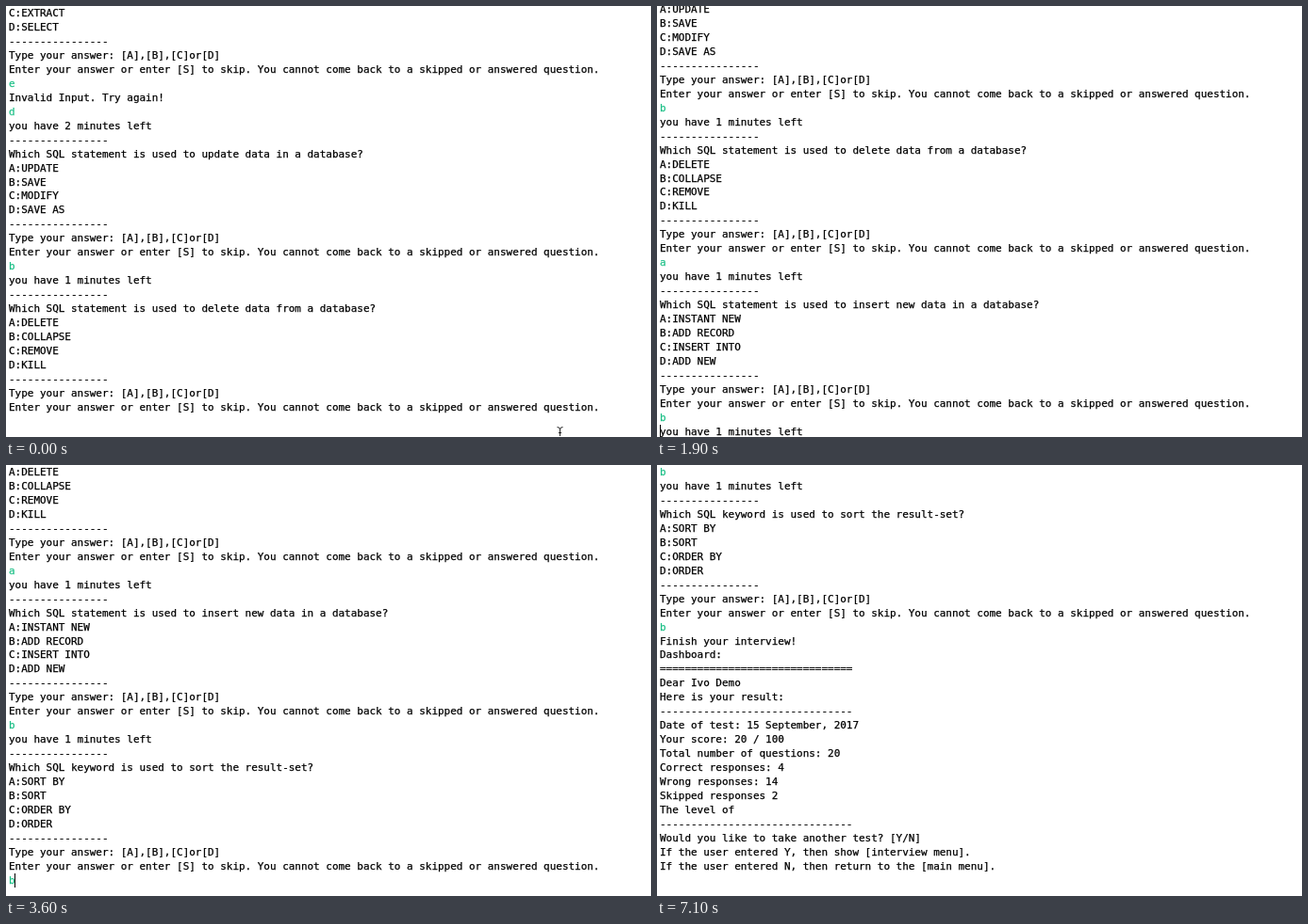
These frames come from a looping animation (684x458 px, 7200 ms). An HTML page:

```html
<!DOCTYPE html>
<html lang="en">
<head>
<meta charset="utf-8">
<title>Console quiz</title>
<style>
  html, body { margin: 0; width: 100%; height: 100%; overflow: hidden; background: #fff; }
  #stage { position: relative; width: 684px; height: 458px; overflow: hidden; background: #fff; }
  .row {
    position: absolute; left: 3px; white-space: pre; color: #000;
    font: 10.963px/15px "DejaVu Sans Mono", "Noto Sans Mono", monospace;
    font-variant-ligatures: none; -webkit-text-stroke: 0.25px;
  }
  .typed { color: #1fc088; }
  #caret { position: absolute; width: 1px; height: 15px; background: #000; }
  #pointer { position: absolute; left: 583px; top: 446px; }
</style>
</head>
<body>
<div id="stage">
  <div id="caret"></div>
  <svg id="pointer" width="10" height="12" fill="none" stroke="#222">
    <path d="M1.5 1.5Q4.5 1.5 4.5 4Q4.5 1.5 7.5 1.5M4.5 3.5V11M3 7.5H6"/>
  </svg>
</div>
<script>
const LOOP = 7200, ROW = 14.96, VISIBLE = 29;
const NUDGE = 4;         // px the view slips before it jumps to the end
const CARET_STAY = 500;  // ms the caret stays after an answer is entered
const stage = document.getElementById("stage");
const caret = document.getElementById("caret");
const pointer = document.getElementById("pointer");

const rule = (n, mark = "-") => mark.repeat(n);
const prompt = [
  rule(16),
  "Type your answer: [A],[B],[C]or[D]",
  "Enter your answer or enter [S] to skip. You cannot come back to a skipped or answered question."
];
const left = n => [`you have ${n} minutes left`, rule(16)];
const ask = (question, ...options) => [
  question, ...options.map((text, i) => "ABCD"[i] + ":" + text), ...prompt
];

const lines = [
  "C:EXTRACT", "D:SELECT", ...prompt,
  "e", "Invalid Input. Try again!", "d", ...left(2),
  ...ask("Which SQL statement is used to update data in a database?",
    "UPDATE", "SAVE", "MODIFY", "SAVE AS"),
  "b", ...left(1),
  ...ask("Which SQL statement is used to delete data from a database?",
    "DELETE", "COLLAPSE", "REMOVE", "KILL")
];

// The user types a key, enters it, and the console prints the reply.
const rounds = [
  { key: "a", typed: 600, entered: 900, printed: 1000, reply: [
    ...left(1),
    ...ask("Which SQL statement is used to insert new data in a database?",
      "INSTANT NEW", "ADD RECORD", "INSERT INTO", "ADD NEW")
  ] },
  { key: "b", typed: 1600, entered: 1900, printed: 2000, reply: [
    ...left(1),
    ...ask("Which SQL keyword is used to sort the result-set?",
      "SORT BY", "SORT", "ORDER BY", "ORDER")
  ] },
  { key: "b", typed: 3400, entered: 3800, printed: 4000, reply: [
    "Finish your interview!", "Dashboard:", rule(31, "="),
    "Dear Ivo Demo", "Here is your result:", rule(31),
    "Date of test: 15 September, 2017", "Your score: 20 / 100",
    "Total number of questions: 20", "Correct responses: 4",
    "Wrong responses: 14", "Skipped responses 2", "The level of", rule(31),
    "Would you like to take another test? [Y/N]",
    "If the user entered Y, then show [interview menu].",
    "If the user entered N, then return to the [main menu]."
  ] }
];
for (const round of rounds) {
  round.row = lines.length;
  lines.push(round.key, ...round.reply);
}

const rows = lines.map(text => {
  const el = document.createElement("div");
  el.className = text.length === 1 ? "row typed" : "row";
  el.textContent = text;
  return stage.insertBefore(el, caret);
});

function show(t) {
  const round = rounds.findLast(r => r.typed <= t);
  const answered = round && t >= round.entered;
  const done = round && t >= round.printed;
  const before = round ? round.row : VISIBLE;
  const end = done ? before + 1 + round.reply.length : before;
  const count = done ? end : before + (answered ? 2 : round ? 1 : 0);
  const scroll = (end - VISIBLE) * ROW + (answered && !done ? NUDGE : 0);
  const place = i => Math.round(i * ROW - scroll) + "px";

  rows.forEach((el, i) => {
    el.style.top = place(i);
    el.style.display = i < count ? "" : "none";
  });
  caret.hidden = !round || t >= round.entered + CARET_STAY;
  caret.style.top = place(answered ? before + 1 : before);
  caret.style.left = answered ? "3px" : "9px";
  pointer.style.display = round ? "none" : "";
}

const start = performance.now();
function tick() {
  show(Math.max(0, performance.now() - start) % LOOP);
  requestAnimationFrame(tick);
}
tick();
</script>
</body>
</html>
```
